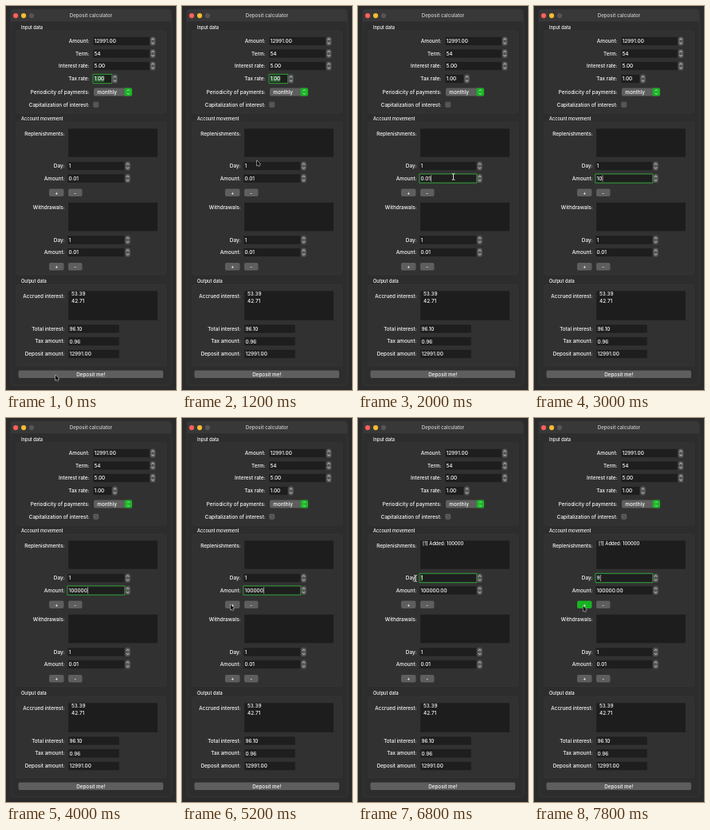
Animation, 213 px wide and 480 px high, one loop 8 s. Source, as an HTML page with a canvas:

```html
<!DOCTYPE html>
<html lang="en">
<head>
<meta charset="utf-8">
<title>Deposit calculator</title>
<style>
html, body { margin: 0; width: 100%; height: 100%; overflow: hidden; background: #2b2b2b; }
canvas { display: block; width: 100vw; height: 100vh; }
</style>
</head>
<body>
<canvas id="stage"></canvas>
<script>
const W = 213, H = 480, LOOP = 8000, STEP = 200;
const canvas = document.getElementById('stage');
const ctx = canvas.getContext('2d');
const FONT = 'Inter, Roboto, sans-serif';
const GREEN = '#18b322', INK = '#fafafa';
const LABEL = 6.35, VALUE = 6.4;

// Pointer stops: [time, x, y, kind]; no kind means hidden while typing.
const POINTER = [
  [0, 61.8, 461.5, 'arrow'], [400, 62, 452, 'arrow'], [600, 66, 402, 'arrow'],
  [800, 76, 315, 'arrow'], [1000, 87, 232, 'arrow'], [1200, 93.7, 193, 'arrow'],
  [1400, 112, 204, 'arrow'], [1600, 119.5, 213.5, 'beam'], [2200, 110, 214, 'beam'],
  [2400, 84, 214, 'beam'], [2600, 52, 214, 'beam'], [2800, 0, 0, ''],
  [4600, 53, 215, 'arrow'], [4800, 56, 222, 'arrow'], [5000, 59, 230, 'arrow'],
  [5200, 60.7, 233.3, 'arrow'], [5600, 72, 222, 'arrow'], [5800, 88, 200.5, 'beam'],
  [6200, 80, 200.5, 'beam'], [6400, 72, 200.5, 'beam'], [7000, 0, 0, ''],
  [7200, 70, 201, 'arrow'], [7400, 66, 217, 'arrow'], [7600, 62, 232, 'arrow'],
  [7800, 61.5, 235, 'arrow']
];

const last = (list, t) => list.filter(k => k[0] <= t).pop();

function typed(t) {
  if (t < 2800) return '0.01';
  if (t >= 5800) return '100000.00';
  const count = t < 3400 ? 1 + (t >= 3000) : Math.min(6, 3 + Math.floor((t - 3400) / STEP));
  return '100000'.slice(0, count);
}

function state(t) {
  const focus = t < 1600 ? 'tax' : t < 5800 ? 'amount' : 'day';
  return {
    focus,
    amount: typed(t),
    day: t < 7000 ? '1' : '9',
    selected: t < 1600 || (t >= 2400 && t < 2800) || (t >= 6200 && t < 7000),
    pressed: t === 5400 || t === 7800,
    added: t >= 5600,
    pointer: last(POINTER, t)
  };
}

function box(x, y, w, h, r, fill, stroke, line = 0.6) {
  ctx.beginPath();
  ctx.roundRect(x, y, w, h, r);
  if (fill) { ctx.fillStyle = fill; ctx.fill(); }
  if (stroke) { ctx.strokeStyle = stroke; ctx.lineWidth = line; ctx.stroke(); }
}

function text(s, x, y, align = 'left', size = LABEL, weight = 500, color = INK) {
  ctx.font = `${weight} ${size}px ${FONT}`;
  ctx.textAlign = align;
  ctx.fillStyle = color;
  ctx.fillText(s, x, y + size * 0.36);
}

function chevrons(x, y, gap, size) {
  ctx.strokeStyle = '#f2f2f2';
  ctx.lineWidth = 0.8;
  ctx.beginPath();
  for (const d of [-1, 1]) {
    ctx.moveTo(x - size, y + d * gap);
    ctx.lineTo(x, y + d * (gap + size));
    ctx.lineTo(x + size, y + d * gap);
  }
  ctx.stroke();
}

function field(x, y, w, value, focused, selected) {
  box(x, y - 5.5, w, 11, 0, '#1e1e1e', '#343434', 0.5);
  const tx = x + 1.5;
  ctx.font = `500 ${VALUE}px ${FONT}`;
  const tw = ctx.measureText(value).width;
  if (focused) box(x - 0.1, y - 5.6, w + 0.4, 11.3, 0.8, null, '#2f8a36', 1.2);
  if (selected) box(tx, y - 4, tw, 8, 0, '#2f5f34');
  text(value, tx, y, 'left', VALUE);
  if (focused && !selected) box(tx + tw + 0.4, y - 4, 0.6, 8, 0, '#f0f0f0');
}

function spin(x, y) {
  box(x - 3.2, y - 5.5, 6.4, 11, 2.5, '#585858');
  chevrons(x, y, 1.6, 1.7);
}

function spinField(label, edge, x, y, w, value, focused, selected) {
  text(label, edge, y, 'right');
  field(x, y, w, value, focused, focused && selected);
  spin(x + w + 4, y);
}

function button(label, x, y, w, h, on) {
  box(x, y, w, h, 2, on ? GREEN : '#5e5e5e');
  text(label, x + w / 2, y + h / 2, 'center');
}

function group(title, y, bottom) {
  text(title, 19, y - 4.3, 'left', 5.65);
  box(13, y, 187.5, bottom - y, 2, '#313131', '#3a3a3a');
}

function list(label, y, h, items, x = 82, size = LABEL) {
  text(label, 73.5, y + 6.5, 'right');
  box(78, y, 112, h, 0, '#1d1d1d', '#303030', 0.5);
  items.forEach((s, i) => text(s, x, y + 4 + i * 9, 'left', size));
}

function arrow(x, y) {
  const pts = [[0, 0], [0, 6.6], [1.5, 5.2], [2.5, 7.5], [3.6, 7], [2.6, 4.8], [4.7, 4.7]];
  ctx.beginPath();
  pts.forEach(([dx, dy]) => ctx.lineTo(x + dx, y + dy));
  ctx.closePath();
  ctx.lineWidth = 1;
  ctx.strokeStyle = '#e8e8e8';
  ctx.stroke();
  ctx.fillStyle = '#000';
  ctx.fill();
}

function beam(x, y) {
  ctx.beginPath();
  for (const d of [-1, 1]) {
    ctx.moveTo(x - 1.8, y + d * 4);
    ctx.quadraticCurveTo(x, y + d * 4, x, y + d * 2.6);
    ctx.quadraticCurveTo(x, y + d * 4, x + 1.8, y + d * 4);
  }
  ctx.moveTo(x, y - 2.6);
  ctx.lineTo(x, y + 2.6);
  ctx.strokeStyle = '#eee';
  ctx.lineWidth = 0.9;
  ctx.stroke();
}

function drawWindow() {
  ctx.fillStyle = '#2b2b2b';
  ctx.fillRect(0, 0, W, H);
  box(6, 4, 201.5, 470, 4, '#2d2d2d', '#3a3a3a');
  box(6.3, 4.3, 200.9, 15, [4, 4, 0, 0], '#383838');
  ['#fb5f57', '#f6bb2f', '#555'].forEach((c, i) => box(9 + i * 10, 9, 6.2, 6.2, 3.1, c));
  text('Deposit calculator', 106.5, 12, 'center', 6.1, 600, '#bdbdbd');
}

function drawInput(s) {
  group('Input data', 31, 134);
  spinField('Amount:', 104.5, 109, 44, 71, '12991.00');
  spinField('Term:', 104.5, 109, 59.5, 71, '54');
  spinField('Interest rate:', 104.5, 109, 75, 71, '5.00');
  spinField('Tax rate:', 104.5, 109, 91, 23.5, '1.00', s.focus === 'tax', s.selected);
  text('Periodicity of payments:', 104.5, 107.5, 'right');
  box(110, 102.5, 48, 10, 2, '#5e5e5e');
  box(148.5, 102.5, 9.5, 10, 2, GREEN);
  chevrons(153.2, 107.5, 1.2, 1.7);
  text('monthly', 114.3, 107.3);
  text('Capitalization of interest:', 104.5, 123.5, 'right');
  box(109.5, 120, 6.5, 6.5, 1.5, '#555', '#5e5e5e');
}

function drawMoves(s) {
  group('Account movement', 145.5, 335.5);
  list('Replenishments:', 153, 36, s.added ? ['[1] Added: 100000'] : [], 81, 5.85);
  spinField('Day:', 73.5, 77, 200, 71.5, s.day, s.focus === 'day', s.selected);
  spinField('Amount:', 73.5, 77, 215.5, 71.5, s.amount, s.focus === 'amount', s.selected);
  button('+', 54, 228.5, 18.5, 9.5, s.pressed);
  button('-', 78, 228.5, 17.5, 9.5);
  list('Withdrawals:', 245.5, 36, []);
  spinField('Day:', 73.5, 77, 292.5, 71.5, '1');
  spinField('Amount:', 73.5, 77, 308, 71.5, '0.01');
  button('+', 54, 321, 18.5, 9.5);
  button('-', 78, 321, 17.5, 9.5);
}

function drawOutput() {
  group('Output data', 348.5, 449.5);
  list('Accrued interest:', 356, 37, ['53.39', '42.71']);
  [['Total interest:', '96.10'], ['Tax amount:', '0.96'], ['Deposit amount:', '12991.00']]
    .forEach(([label, value], i) => {
      const y = 403.5 + i * 15.7;
      text(label, 73.5, y, 'right');
      field(78, y, 64, value);
    });
  button('Deposit me!', 15.5, 455.5, 181.5, 9.5);
}

function frame(now) {
  const t = Math.floor(now % LOOP / STEP) * STEP;
  const s = state(t);
  const ratio = window.devicePixelRatio || 1;
  const w = Math.round(innerWidth * ratio), h = Math.round(innerHeight * ratio);
  if (canvas.width !== w || canvas.height !== h) { canvas.width = w; canvas.height = h; }
  ctx.setTransform(w / W, 0, 0, h / H, 0, 0);
  drawWindow();
  drawInput(s);
  drawMoves(s);
  drawOutput();
  const [, x, y, kind] = s.pointer;
  if (kind === 'arrow') arrow(x, y);
  if (kind === 'beam') beam(x, y);
  requestAnimationFrame(frame);
}
requestAnimationFrame(frame);
</script>
</body>
</html>
```
